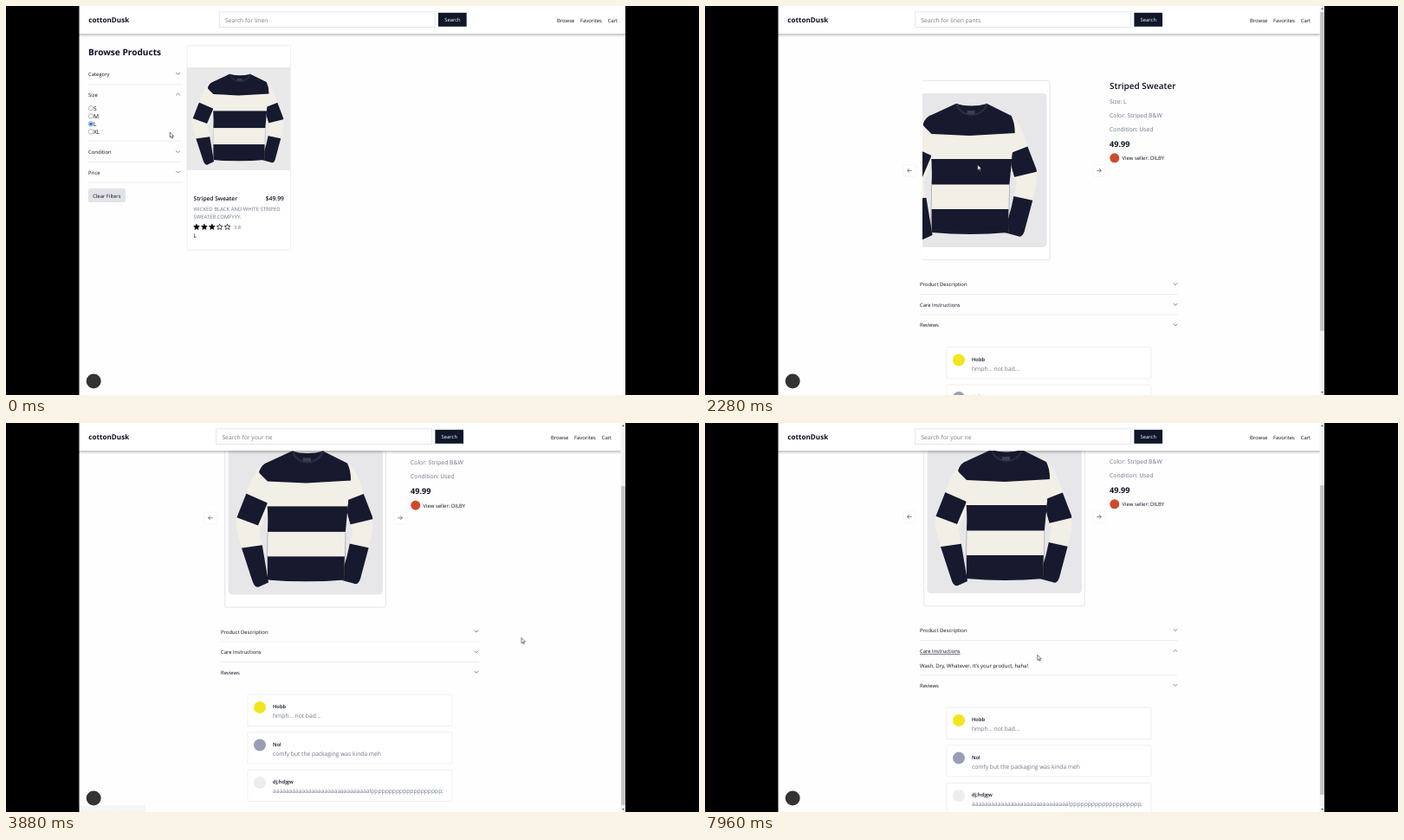
An HTML page for the animation above (8000 ms loop, 800 by 450 pixels).

```html
<!DOCTYPE html>
<html lang="en">
<head>
<meta charset="utf-8">
<title>Shop demo</title>
<style>
html, body { margin: 0; width: 100%; height: 100%; overflow: hidden; background: #000; }
svg { display: block; width: 100vw; height: 100vh; }
text { font-family: "Open Sans", "Noto Sans", sans-serif; text-rendering: geometricPrecision; white-space: pre; }
.line { fill: none; stroke: #e4e7ec; stroke-width: .7; }
.icon { fill: none; stroke: #555b66; stroke-width: .75; stroke-linecap: round; stroke-linejoin: round; }
</style>
</head>
<body>
<svg id="stage" viewBox="0 0 800 450" xmlns="http://www.w3.org/2000/svg"></svg>
<script>
const LOOP = 8000, ROW = 16.5;
const INK = '#0b1020', NAVY = '#0f172a', GREY = '#6b7385', PAPER = '#fefefe';
const WOOL = '#171a2e', CREAM = '#f1efe6';

const text = (x, y, str, size = 5.9, fill = INK, weight = 400, more = '') =>
  `<text x="${x}" y="${y}" font-size="${size}" fill="${fill}" font-weight="${weight}" ${more}>${str}</text>`;
const rect = (x, y, w, h, fill, more = '') =>
  `<rect x="${x}" y="${y}" width="${w}" height="${h}" fill="${fill}" ${more}/>`;
const rule = (x1, x2, y) => `<path class="line" d="M${x1} ${y}H${x2}"/>`;
const group = (id, body, more = '') => `<g id="${id}" ${more}>${body}</g>`;
const chevron = (x, y, id = '', up = false) =>
  `<g transform="translate(${x} ${y})"><path ${id && `id="${id}"`} class="icon" d="M-2-1L0 1L2-1" transform="rotate(${up ? 180 : 0})"/></g>`;
const clip = (id, shape) => `<clipPath id="${id}">${shape}</clipPath>`;
const poly = points => `<polygon points="${points}" fill="${WOOL}"/>`;

const shapes = {
  left: 'M44 25Q31 30 21 62L10 90Q8 100 14 118L28 161Q31 171 36 169L47 164L41 128L37 104L46 80L54 40Z',
  right: 'M135 25Q149 29 157 62L167 88Q169 100 165 115L153 160Q150 168 145 165L130 161L138 132L144 104L136 80L128 40Z',
  body: 'M74 12Q92 17 110 12L138 26Q145 40 140 62L136 104Q134 140 135 161Q90 165 46 161L46 104Q48 60 36 36Q39 27 46 25Z'
};
const part = (name, stripes) =>
  `<g clip-path="url(#${name})"><path d="${shapes[name]}" fill="${CREAM}"/>${stripes}</g>`;
const sweater = `<g id="sweater">
  ${part('left', poly('21,61 46,72 35,98 8,88') + poly('10,125 45,120 55,175 20,175'))}
  ${part('right', poly('135,70 158,61 170,90 141,97') + poly('136,118 168,125 150,175 125,170'))}
  ${part('body', poly('35,36 46,47 90,49 143,46 150,10 40,8') + rect(40, 76, 110, 29.5, WOOL) + rect(40, 134, 110, 30, WOOL))}
  <path d="M75 12Q78 24 92 25Q106 24 110 12" fill="none" stroke="#2a2e42" stroke-width="2"/>
  ${rect(87, 20, 9, 4, '#3b3f50')}
  <path d="M46 106L45 160M136 106L135 160" stroke="#0004" stroke-width=".8"/>
</g>`;

const star = (x, full) => {
  const points = Array.from({ length: 10 }, (_, i) => {
    const r = i % 2 ? 1.6 : 3.5, a = i * Math.PI / 5;
    return `${(x + r * Math.sin(a)).toFixed(2)},${(255.7 - r * Math.cos(a)).toFixed(2)}`;
  });
  return `<polygon points="${points.join(' ')}" fill="${full ? '#050505' : 'none'}" stroke="#050505" stroke-width=".7" stroke-linejoin="round"/>`;
};

const radio = (label, i) => {
  const y = 118.3 + i * 9.05, on = label === 'L';
  return `<circle cx="98" cy="${y}" r="2.7" fill="#fff" stroke="${on ? '#2f5fd0' : '#85878c'}" stroke-width=".6"/>` +
    (on ? `<circle cx="98" cy="${y}" r="1.7" fill="#2f5fd0"/>` : '') + text(101, y + 2.5, label, 6.7);
};

const browse = [
  text(95, 56.8, 'Browse Products', 10.1, INK, 700),
  ...[['Category', 78.7], ['Size', 102.3], ['Condition', 169], ['Price', 192.3]].map(([name, y]) =>
    text(95, y + 2.2, name) + chevron(198.6, y - .3, '', name === 'Size')),
  ...[91, 156, 180.3, 204].map(y => rule(95, 203, y)),
  ...['S', 'M', 'L', 'XL'].map(radio),
  rect(95, 211, 43, 16, '#e1e3e7', 'rx="2"'),
  text(116.3, 221.6, 'Clear Filters', 5.9, INK, 400, 'text-anchor="middle"'),
  rect(209, 46, 119.5, 236, '#fff', 'id="card" rx="1.5" stroke="#eceef1" stroke-width=".7"'),
  group('photo', rect(209, 71, 119, 119, '#e9e9ea') +
    '<use href="#sweater" transform="translate(208.7 70.7) scale(.667)"/>'),
  group('view', rect(255, 122.3, 27, 16, NAVY, 'rx="2.5"') +
    text(268.5, 132.6, 'View', 5.9, '#fff', 400, 'text-anchor="middle"')),
  text(216.5, 225.4, 'Striped Sweater', 6.6, INK, 600),
  text(321, 225.4, '$49.99', 6.8, INK, 600, 'text-anchor="end"'),
  text(216.5, 236.7, 'WICKED BLACK AND WHITE STRIPED', 5.95, GREY),
  text(216.5, 245.7, 'SWEATER COMFYYY.', 5.95, GREY),
  ...[0, 1, 2, 3, 4].map(i => star(220 + i * 8.9, i < 3)),
  text(263, 258, '3.8', 5.8, GREY),
  text(216.5, 268.3, 'L', 6.6)
].join('');

const arrow = (x, dir) => rect(x - 7, 183.7, 14, 13.5, '#fff', 'rx="1.5" stroke="#eef0f3" stroke-width=".6"') +
  `<path class="icon" d="M${x - 2.3} 190.4h4.6M${x + dir * .4} 188.5l${dir * 1.9} 1.9l${-dir * 1.9} 1.9"/>`;

const review = ([name, words, color], i) => {
  const y = 394.7 + i * 43.6;
  return rect(279, y, 236, 36.3, '#fff', 'rx="1" stroke="#e6e8ed" stroke-width=".7"') +
    `<circle cx="293" cy="${y + 14.8}" r="7" fill="${color}"/>` +
    text(308, y + 15.9, name, 5.8, INK, 600) + text(308, y + 26.9, words, 6.7, GREY);
};

const reviews = [
  ['Hobb', 'hmph... not bad...', '#f0e51e'],
  ['Nol', 'comfy but the packaging was kinda meh', '#9a9db4'],
  ['dj;hdjgw', 'a'.repeat(30) + 'l' + 'p'.repeat(20) + ';', '#ececec']
];

const product = [
  group('slide', rect(252.7, 86.3, 185.6, 207.4, '#fff', 'rx="1.5" stroke="#dfe1e6" stroke-width=".9"') +
    rect(256.5, 101, 178.5, 178, '#e7e7e9', 'rx="4.5"') +
    '<use href="#sweater" transform="translate(256 101)"/>'),
  arrow(236, -1), arrow(455, 1),
  text(467, 96.2, 'Striped Sweater', 10, INK, 600),
  ...['Size: L', 'Color: Striped B&amp;W', 'Condition: Used'].map((s, i) => text(467, 112.8 + i * 16, s, 6.8, GREY)),
  text(467, 162.5, '49.99', 9.1, INK, 700),
  '<circle cx="472.8" cy="175.8" r="5.5" fill="#cf4a2c"/>',
  text(481.5, 178.3, 'View seller: DILBY', 5.95, INK, 400, 'id="seller"'),
  text(248, 324.4, 'Product Description', 5.9, INK, 400, 'id="descHead"'),
  chevron(543, 321.7, 'descIcon'),
  text(248, 340.6, 'WICKED BLACK AND WHITE STRIPED SWEATER COMFYYY.', 6, INK, 400, 'clip-path="url(#descClip)"'),
  group('care', rule(248, 546, 333.5) +
    text(248, 347.9, 'Care Instructions', 5.9, INK, 400, 'id="careHead"') + chevron(543, 345.4, 'careIcon') +
    text(248, 364.5, 'Wash, Dry, Whatever. It’s your product, haha!', 6, INK, 400, 'clip-path="url(#careClip)"')),
  group('rest', rule(248, 546, 357.1) + text(248, 371.4, 'Reviews') + chevron(543, 368.9) +
    reviews.map(review).join(''))
].join('');

const header = rect(84, 32, 631, 4, 'url(#shade)') + rect(84, 0, 631, 32, '#fff') +
  text(95.3, 19.3, 'cottonDusk', 8.1, INK, 700) +
  group('search', rect(246.3, 6.8, 249, 17.7, '#fff', 'stroke="#dcdfe5" stroke-width=".8"') +
    text(253, 18.6, '', 6.77, '#777b84', 400, 'id="hint"') +
    rect(499, 7.8, 32.7, 16, NAVY) +
    text(515.4, 18.3, 'Search', 5.85, '#fff', 400, 'text-anchor="middle"')) +
  group('nav', text(636, 18.5, 'Browse') + text(663, 18.5, 'Favorites') + text(694.7, 18.5, 'Cart'));

const scrollbar = group('bar', rect(709.5, 0, 6, 450, '#f3f3f3') +
  rect(710.2, 8, 4.6, 366, '#c3c3c3', 'id="thumb"') +
  '<path d="M711 4l1.5-2l1.5 2zM711 446l1.5 2l1.5-2z" fill="#666"/>');

const status = group('status', rect(84, 442.5, 98, 8, '#3a3b3e', 'id="statusBox"') +
  text(86, 448.3, '', 4.9, '#e9e9e9', 400, 'id="url"'));

const pointer = group('pointer',
  '<path id="arrowShape" d="M0 0V6.2L1.5 4.9L2.5 7.1L3.5 6.6L2.5 4.5H4.4Z" fill="#fff" stroke="#222" stroke-width=".6"/>' +
  '<path id="handShape" d="M-.8.8Q0-.4.8.8V3L3.6 3.8Q4.3 4 4.2 5L3.6 8.3H-.6L-2.8 5.3Q-2.4 4.2-.8 5.2Z" fill="#fff" stroke="#222" stroke-width=".6"/>');

const stage = document.getElementById('stage');
stage.innerHTML = `<defs>
  ${Object.entries(shapes).map(([id, d]) => clip(id, `<path d="${d}"/>`)).join('')}
  ${clip('frame', rect(251, 80, 190, 220, '#000'))}
  ${clip('descClip', rect(240, 331, 310, 0, '#000', 'id="descRect"'))}
  ${clip('careClip', rect(240, 354, 310, 0, '#000', 'id="careRect"'))}
  <linearGradient id="shade" x2="0" y2="1"><stop stop-color="#000" stop-opacity=".24"/><stop offset="1" stop-color="#000" stop-opacity="0"/></linearGradient>
  ${sweater}</defs>` +
  rect(0, 0, 800, 450, PAPER) + group('browse', browse) + group('product', product) + header +
  '<circle cx="101.2" cy="434" r="8.5" fill="#333"/>' + status + scrollbar + pointer +
  rect(0, 0, 84.5, 450, '#000') + rect(715, 0, 85, 450, '#000');

const el = {};
stage.querySelectorAll('[id]').forEach(node => el[node.id] = node);
const slideFrame = document.createElementNS('http://www.w3.org/2000/svg', 'g');
slideFrame.setAttribute('clip-path', 'url(#frame)');
el.slide.replaceWith(slideFrame);
slideFrame.append(el.slide);

// [time, x, y]
const path = [
  [0, 189.3, 146], [120, 190, 146], [640, 263, 140], [880, 264.3, 140.7], [1560, 264.3, 140.7],
  [1880, 355, 178], [2260, 314.8, 183.7], [2400, 315, 183.7], [2760, 463, 196.5], [3000, 503, 176],
  [3260, 506, 177], [3640, 595, 248.5], [4100, 595, 248.5], [4520, 338, 242], [4900, 332.6, 243],
  [6040, 332.6, 243], [6400, 334, 243], [6700, 345, 263], [7200, 348, 264], [7900, 383.8, 268.3], [8000, 383.8, 268.3]
];
const clamp = v => Math.max(0, Math.min(1, v));
const ramp = (t, a, b) => clamp((t - a) / (b - a));
const smooth = p => p * p * (3 - 2 * p);
const easeOut = p => 1 - (1 - p) ** 3;
const within = (t, a, b) => t >= a && t < b;
const set = (id, attrs) => { for (const k in attrs) el[id].setAttribute(k, attrs[k]); };
const show = (id, on) => set(id, { visibility: on ? 'visible' : 'hidden' });
const move = (id, x, y) => set(id, { transform: `translate(${x} ${y})` });
const underline = (id, on) => set(id, { 'text-decoration': on ? 'underline' : 'none' });

function position(t) {
  const i = Math.max(1, path.findIndex(p => p[0] > t));
  const [t0, x0, y0] = path[i - 1], [t1, x1, y1] = path[i];
  const p = smooth(ramp(t, t0, t1));
  return [x0 + (x1 - x0) * p, y0 + (y1 - y0) * p];
}

function hintText(t) {
  const second = t >= 3150;
  const words = second ? 'your new favorite tote' : 'linen pants';
  const typed = second ? Math.floor((t - 3150) / 103) : 5 + Math.floor(t / 100);
  const erased = Math.max(0, Math.floor((t - (second ? 7080 : 2290)) / 58));
  const count = Math.max(0, Math.min(words.length, typed) - erased);
  return 'Search for ' + words.slice(0, count);
}

function draw(t) {
  const onProduct = t >= 1160;
  show('browse', !onProduct);
  show('product', onProduct);
  show('bar', onProduct);
  move('search', onProduct ? -3.6 : 0, 0);
  move('nav', onProduct ? -7 : 0, 0);
  el.hint.textContent = hintText(t);

  const hover = smooth(ramp(t, 330, 640));
  set('photo', { opacity: 1 - .76 * hover });
  set('view', { opacity: hover });
  el.card.style.filter = `drop-shadow(0 ${.4 + hover * .8}px ${.6 + hover}px rgba(0,0,0,${.1 + .13 * hover}))`;

  const drag = smooth(ramp(t, 1880, 2260)) - easeOut(ramp(t, 2300, 2640));
  move('slide', -40.4 * drag, 0);

  const desc = easeOut(ramp(t, 4600, 4800)) - easeOut(ramp(t, 6350, 6550));
  const care = easeOut(ramp(t, 6950, 7150));
  move('care', 0, ROW * desc);
  move('rest', 0, ROW * (desc + care));
  set('descRect', { height: ROW * desc });
  set('careRect', { height: ROW * care });
  set('descIcon', { transform: `rotate(${180 * desc})` });
  set('careIcon', { transform: `rotate(${180 * care})` });
  underline('descHead', within(t, 4420, 6560));
  underline('careHead', t >= 6560);
  underline('seller', within(t, 2920, 3360));

  const scroll = 82 * easeOut(ramp(t, 3480, 4020));
  move('product', 0, -scroll);
  const page = 532 + ROW * (desc + care);
  set('thumb', { y: 7 + scroll * 436 / page, height: 450 * 436 / page });

  const seller = t >= 2000;
  el.url.textContent = 'http://localhost:3000/' + (seller ? 'sellers/seller' : 'products/sweater-2');
  set('statusBox', { width: seller ? 77 : 98 });
  set('status', { opacity: seller ? ramp(t, 2950, 3050) - ramp(t, 3480, 3900) : ramp(t, 480, 580) - ramp(t, 1180, 1340) });

  const hand = within(t, 520, 1160) || within(t, 2920, 3360);
  show('handShape', hand);
  show('arrowShape', !hand);
  move('pointer', ...position(t));
}

const start = performance.now();
function tick() {
  draw((performance.now() - start) % LOOP);
  requestAnimationFrame(tick);
}
tick();
</script>
</body>
</html>
```
